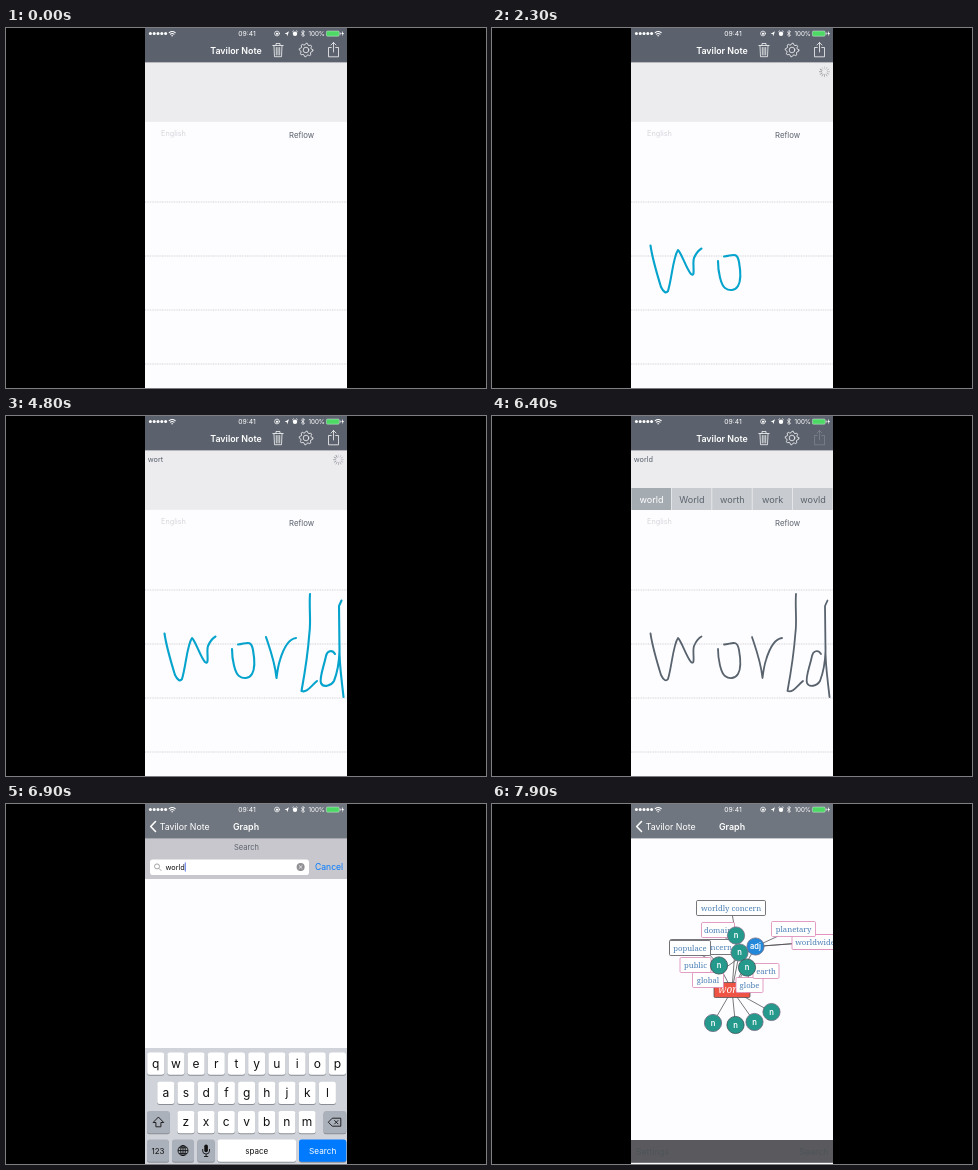
Write an HTML page that moves like this. It is 480 by 360 pixels and loops after 8000 ms.

```html
<!DOCTYPE html>
<html lang="en">
<head>
<meta charset="utf-8">
<style>
html, body { margin: 0; width: 100%; height: 100%; overflow: hidden; background: #000; }
svg { display: block; width: 100%; height: 100%; }
text { font-family: Inter, Roboto, sans-serif; }
.serif { font-family: "Noto Serif", serif; }
.line { fill: none; stroke: #fff; stroke-width: .75; stroke-linecap: round; stroke-linejoin: round; }
</style>
</head>
<body>
<svg id="stage" viewBox="0 0 480 360"></svg>
<script>
const LOOP = 8000, STEP = 100;
const SLATE = '#5b626d', NAV_LIGHT = '#6f767f', PAPER = '#fdfcff', BLUE = '#007aff';
const APP = 'Tavilor Note';

const clamp = v => Math.max(0, Math.min(1, v));
const span = (t, a, b) => clamp((t - a) / (b - a));
const easeOut = p => 1 - (1 - p) ** 3;
const easeBoth = p => p * p * (3 - 2 * p);
const mix = (a, b, p) => a + (b - a) * p;

const rect = (x, y, w, h, fill, extra = '') =>
  `<rect x="${x}" y="${y}" width="${w}" height="${h}" fill="${fill}" ${extra}/>`;
const text = (x, y, size, fill, str, extra = '') =>
  `<text x="${x}" y="${y}" font-size="${size}" fill="${fill}" ${extra}>${str}</text>`;
const line = (d, extra = '') => `<path class="line" d="${d}" ${extra}/>`;
const MID = 'text-anchor="middle"', BOLD = 'font-weight="600"';

// Handwriting: path, start and end of each stroke
const strokes = [
  ['M158.5 217.5C160 228 165 246 169 259Q173 267 176 263C180 250 181 229 186 222C190 226 194 240 199 246C204 250 200 236 202 230Q205 223 209.5 220.5', 1100, 1800],
  ['M226 233C226 244 229 257 233 260S243 263 246 258S249 245 247 234S240 228 232 228.5', 1900, 2300],
  ['M260 221C263 230 269 246 270.5 262C271 258 272 250 274 244C277 234 282 223 290 222', 2600, 3000],
  ['M304 178C303 190 305 206 303.5 216C302 236 299 256 295.5 275C301 277 305 270 311 265', 3200, 3700],
  ['M329 238C326 233 321 235 320 240C318 250 313 262 315 267S325 270 328 265Q333 252 333.5 235L333 190L335.5 184.5M333.5 230C333 248 336 266 337.5 281', 3900, 4600],
];

// Graph labels: text, width, border, position early and late, parent hub
const PINK = '#dc86b5', DARK = '#55555a';
const labels = [
  ['domain', 33, PINK, 230, 146, 226, 126, 2],
  ['world-wide', 45, PINK, 248, 153, 323, 138, 4],
  ['worldwide', 46, PINK, 290, 147, 323, 138, 4],
  ['worldly concern', 69, DARK, 217, 133, 239, 104, 1],
  ['earthly concern', 66, DARK, 217, 155, 211, 143, 0],
  ['populace', 41, DARK, 184.5, 162, 198, 144, 0],
  ['public', 31, PINK, 195.5, 179, 203.5, 161, 0],
  ['world', 36, DARK, 240, 186, 240, 186, -1],
  ['global', 31, PINK, 246, 169, 216, 176, 4],
  ['globe', 27, PINK, 262.5, 178, 257.5, 181, 3],
  ['earth', 26, PINK, 274, 192, 274, 167, 3],
  ['planetary', 44, PINK, 271.5, 137, 301.5, 125, 4],
];
const hubs = [
  [260, 161, 227, 161.5], [247, 135, 244, 131.5], [277, 159, 247.5, 148.5],
  [279, 175, 255, 163.5], [296, 177, 263.5, 142.5], [237, 221, 221, 219],
  [256, 222, 243.5, 221], [273, 216, 262.5, 218], [295, 209, 279.5, 208],
];
const ROOT = [240, 186];

function statusBar() {
  let s = '';
  for (let i = 0; i < 5; i++) s += `<circle cx="${144.4 + i * 3.8}" cy="5.5" r="1.5" fill="#fff"/>`;
  s += line('M163.2 4.7Q166.2 2.2 169.2 4.7M164.4 6.2Q166.2 4.7 168 6.2M165.8 7.7h.8', 'style="stroke-width:1.1"');
  s += text(241, 8, 6.8, '#fff', '09:41', MID);
  s += '<circle cx="271" cy="5.5" r="2.4" class="line"/>' + rect(270, 4.8, 2, 1.8, '#fff');
  s += '<path d="M278.5 6L283 3.2L281.2 8.2L280.7 6Z" fill="#fff"/>';
  s += '<circle cx="289" cy="5.7" r="2.2" fill="#fff"/>' + line('M286.6 3.6l1-.8M291.4 3.6l-1-.8');
  s += line('M295.3 3.9L298.5 7L297 8.6V2.4L298.5 4L295.3 7.1');
  s += text(302.5, 8, 6.2, '#fff', '100%');
  s += rect(320.4, 3, 12.8, 5.2, '#4cd964', 'rx="1" stroke="#d8dde0" stroke-width=".5"');
  s += rect(333.8, 4.6, .8, 2, '#fff') + '<path d="M337 2.8L335.3 6H336.5L336 8.4L338 5H336.8Z" fill="#fff"/>';
  return s;
}

function navIcons() {
  const gear = Array.from({ length: 33 }, (_, i) => {
    const a = i * Math.PI / 16, r = i % 4 < 2 ? 6.8 : 5.3;
    return `${300 + r * Math.cos(a)} ${22 + r * Math.sin(a)}`;
  }).join('L');
  return line('M266.8 17.5h10.4M270 17.3v-1.8h4v1.8M268 17.8l.5 10.9h7l.5-10.9M270.3 19.5v7.5M272 19.5v7.5M273.7 19.5v7.5')
    + line(`M${gear}Z`) + '<circle class="line" cx="300" cy="22" r="2.8"/>'
    + `<g id="share">${line('M325.3 19.5H322.5V28.8H332.5V19.5H329.7M327.5 24V14.6M325 17l2.5-2.5L330 17')}</g>`;
}

function writingPage() {
  let s = rect(139, 34, 202, 326, PAPER) + rect(139, 34.4, 202, 59.4, '#ececee');
  for (let y = 174; y < 360; y += 54)
    s += `<path d="M139 ${y}H341" stroke="#d2d2d6" stroke-width="1" stroke-dasharray="1 .7"/>`;
  s += text(155, 107.8, 7.3, '#d6d6da', 'English') + text(283, 110.2, 7.8, SLATE, 'Reflow');
  s += text(141.7, 45.8, 7.3, SLATE, '', 'id="result"');
  s += '<g id="choices">' + ['world', 'World', 'worth', 'work', 'wovld'].map((w, i) => {
    const x = 139 + i * 40.4;
    return rect(x + .4, 72, 39.6, 22, i ? '#c8ccd0' : '#a4abb1')
      + text(x + 20.5, 86.6, 9.1, i ? SLATE : '#fff', w, MID);
  }).join('') + '</g><g id="spinner">';
  for (let i = 0; i < 12; i++)
    s += `<path d="M332.5 40.8V38.7" stroke="#777b82" stroke-width=".8" stroke-linecap="round" opacity="${.25 + i * .055}" transform="rotate(${i * 30} 332.5 43.7)"/>`;
  s += '</g><g id="ink" fill="none" stroke-linecap="round" stroke-linejoin="round">';
  return s + strokes.map(([d]) => `<path d="${d}" pathLength="1"/>`).join('') + '</g>';
}

function searchBar() {
  return rect(139, 34, 202, 41, '#c8c7cd')
    + text(240.5, 46, 7.5, SLATE, 'Search', MID)
    + rect(144, 55.5, 159, 15.5, '#fff', 'rx="2.8"')
    + '<g fill="none" stroke="#8e8e93" stroke-width=".8"><circle cx="151" cy="62.4" r="2.5"/><path d="M152.9 64.3l2.4 2.5"/></g>'
    + text(159.5, 65.8, 7.3, '#111', 'world') + rect(178.8, 58.5, .9, 9, '#3f66e0', 'id="caret"')
    + '<circle cx="294.6" cy="63" r="4" fill="#8e8e93"/>' + line('M293.1 61.5l3 3M296.1 61.5l-3 3')
    + text(309, 66, 8.6, BLUE, 'Cancel');
}

function toolbar() {
  const INK = '#4d5558';
  return rect(139, 336, 202, 22.8, '#5a595e')
    + text(144, 351.3, 8.6, INK, 'Settings') + text(307, 351.3, 8.9, INK, 'Search');
}

function keyboard() {
  const key = (x, y, w, label = '', size = 12, fill = '#fff', ink = '#111', id = '') =>
    rect(x, y + 1, w, 22.3, '#8b8f95', 'rx="2.5"')
    + rect(x, y, w, 22.3, fill, `rx="2.5" ${id && `id="${id}"`}`)
    + text(x + w / 2, y + (size > 10 ? 15 : 14.4), size, ink, label, `${MID} ${id && `id="${id}Text"`}`);
  const GREY = '#abb1bb';
  let s = rect(139, 244, 202, 116, '#d0d4da');
  [['qwertyuiop', 141.2, 248.5], ['asdfghjkl', 151.3, 277.8], ['zxcvbnm', 171.4, 307]].forEach(([row, x, y]) =>
    [...row].forEach((c, i) => { s += key(x + i * 20.2, y, 17, c); }));
  s += key(141, 307, 22.8, '', 8, GREY) + key(317.5, 307, 22.8, '', 8, GREY);
  s += key(141, 335.5, 22, '123', 8, GREY) + key(166, 335.5, 22, '', 8, GREY) + key(191.3, 335.5, 17.5, '', 8, GREY);
  s += key(211.5, 335.5, 78.5, 'space', 8) + key(293, 335.5, 47.3, 'Search', 8.2, BLUE, '#fff', 'go');
  s += '<g fill="none" stroke="#111" stroke-width=".9" stroke-linejoin="round">'
    + '<path d="M152.4 313l5.3 5.5h-2.8v4.3h-5v-4.3h-2.8Z"/>'
    + '<path d="M322.3 318.2l4-4h8.5v8h-8.5ZM328.3 316.2l4 4M332.3 316.2l-4 4"/>'
    + '<circle cx="177" cy="346.6" r="5"/><ellipse cx="177" cy="346.6" rx="2.3" ry="5"/><path d="M172 346.6h10M177 341.6v10M173 343.8h8M173 349.4h8"/>'
    + '<path d="M196.7 345v2q0 3 3.4 3t3.4-3v-2M200.1 350v2.5M198 352.5h4.2"/></g>'
    + rect(198.3, 340.5, 3.6, 7.8, '#111', 'rx="1.8"');
  return s;
}

function graphMarkup() {
  const edges = labels.length - 1 + hubs.length;
  let s = '<path class="edge" stroke="#4c4c50" stroke-width=".75"/>'.repeat(edges);
  s += labels.map(([word, w, border]) => {
    const root = word === 'world';
    return '<g class="node">' + rect(-w / 2, -7.5, w, 15, root ? '#ee5344' : '#fff', `rx="1.2" stroke="${border}" stroke-width=".8"`)
      + text(0, root ? 3.4 : 2.7, root ? 10 : 7.7, root ? '#fff' : '#4a7fb5', word, `class="serif" ${MID} ${root ? 'font-style="italic"' : ''}`) + '</g>';
  }).join('');
  return s + hubs.map((_, i) => {
    const adj = i === 4;
    return `<g class="node"><circle r="8.6" fill="${adj ? '#2388d9' : '#24998c'}" stroke="${i % 3 ? '#6f6a80' : '#3c4f54'}" stroke-width=".8"/>`
      + text(0, 2.5, adj ? 7.4 : 7.6, '#fff', adj ? 'adj' : 'n', `${MID} ${BOLD}`) + '</g>';
  }).join('');
}

const stage = document.getElementById('stage');
stage.innerHTML = `<defs><clipPath id="phone"><rect x="139" width="202" height="360"/></clipPath></defs>
${rect(0, 0, 480, 360, '#000')}
<g clip-path="url(#phone)">
  <g id="writing">${writingPage()}</g>
  <g id="graphPage">${rect(139, 34, 202, 326, PAPER)}
    <g id="graph">${graphMarkup()}</g>
    <g id="searchBar">${searchBar()}</g>
    <g id="toolbar">${toolbar()}</g>
    <g id="keys">${keyboard()}</g>
  </g>
  ${rect(139, 0, 202, 34.4, SLATE, 'id="nav"')}
  ${statusBar()}
  <g id="homeNav">${text(230, 25.6, 8.9, '#fff', APP, `${MID} ${BOLD} id="title"`)}${navIcons()}</g>
  <g id="backNav">${line('M149.5 17.5L144.7 22.5L149.5 27.5', 'style="stroke-width:1.6"')}${text(153.7, 25.6, 8.8, '#fff', APP)}</g>
  ${text(240, 25.6, 8.9, '#fff', 'Graph', `${MID} ${BOLD} id="graphTitle"`)}
</g>`;

const $ = id => document.getElementById(id);
const set = (el, name, value) => el.setAttribute(name, value);
const fade = (id, v) => set($(id), 'opacity', v);
const move = (id, x, y) => set($(id), 'transform', `translate(${x} ${y})`);
const inkPaths = [...$('ink').children];
const edgeEls = [...stage.querySelectorAll('.edge')];
const nodeEls = [...stage.querySelectorAll('.node')];

function drawInk(t) {
  const p = span(t, 5100, 5400);
  const channel = (a, b) => Math.round(mix(a, b, p));
  set($('ink'), 'stroke', `rgb(${channel(6, 88)},${channel(164, 99)},${channel(205, 110)})`);
  set($('ink'), 'stroke-width', mix(2.1, 1.8, p));
  strokes.forEach(([, from, to], i) => {
    const done = span(t, from, to);
    set(inkPaths[i], 'stroke-dasharray', done < 1 ? `${done} 2` : 'none');
    set(inkPaths[i], 'opacity', done > 0 ? 1 : 0);
  });
}

function drawGraph(t) {
  const grow = easeOut(span(t, 7300, 7700)), drift = easeBoth(span(t, 7700, 7900));
  const place = (x0, y0, x1, y1) => [
    mix(mix(ROOT[0], x0, grow), x1, drift),
    mix(mix(ROOT[1], y0, grow), y1, drift)];
  const hubAt = hubs.map(h => place(...h));
  const labelAt = labels.map(l => place(...l.slice(3, 7)));
  [...labelAt, ...hubAt].forEach(([x, y], i) => set(nodeEls[i], 'transform', `translate(${x} ${y})`));
  const pairs = hubAt.map(h => [ROOT, h]);
  labels.forEach((l, i) => { if (l[7] >= 0) pairs.push([hubAt[l[7]], labelAt[i]]); });
  pairs.forEach(([a, b], i) => set(edgeEls[i], 'd', `M${a}L${b}`));
  fade('graph', t >= 7400 ? 1 : 0);
}

function render(t) {
  drawInk(t);
  drawGraph(t);
  const known = t >= 5200;
  $('result').textContent = known ? 'world' : t >= 4200 ? 'wort' : '';
  fade('choices', known ? 1 : 0);
  fade('spinner', t >= 1600 && !known ? 1 : 0);
  set($('spinner'), 'transform', `rotate(${Math.floor(t / STEP) * 30} 332.5 43.7)`);
  fade('share', t >= 6300 ? .22 : 1);

  const push = easeOut(span(t, 6400, 6900));
  move('writing', -60 * push, 0);
  move('graphPage', 202 * (1 - push), 0);
  fade('homeNav', 1 - push);
  set($('title'), 'x', mix(230, 180, push));
  fade('backNav', push);
  fade('graphTitle', push);
  set($('graphTitle'), 'x', mix(320, 240, push));
  set($('nav'), 'fill', t >= 6800 ? NAV_LIGHT : SLATE);

  const leave = span(t, 7400, 7800);
  fade('searchBar', t >= 7800 ? 0 : mix(1, .13, span(t, 7400, 7700)));
  fade('caret', t < 7100 ? 1 : 0);
  move('keys', 0, 116 * Math.pow(leave, 1.16));
  const pressed = t >= 7300 && t < 7400;
  set($('go'), 'fill', pressed ? '#fff' : BLUE);
  set($('goText'), 'fill', pressed ? '#111' : '#fff');
  fade('toolbar', span(t, 7700, 7900));
}

const start = performance.now();
function tick() {
  const t = (performance.now() - start) % LOOP;
  render(Math.floor(t / STEP) * STEP);
  requestAnimationFrame(tick);
}
render(0);
requestAnimationFrame(tick);
</script>
</body>
</html>
```
